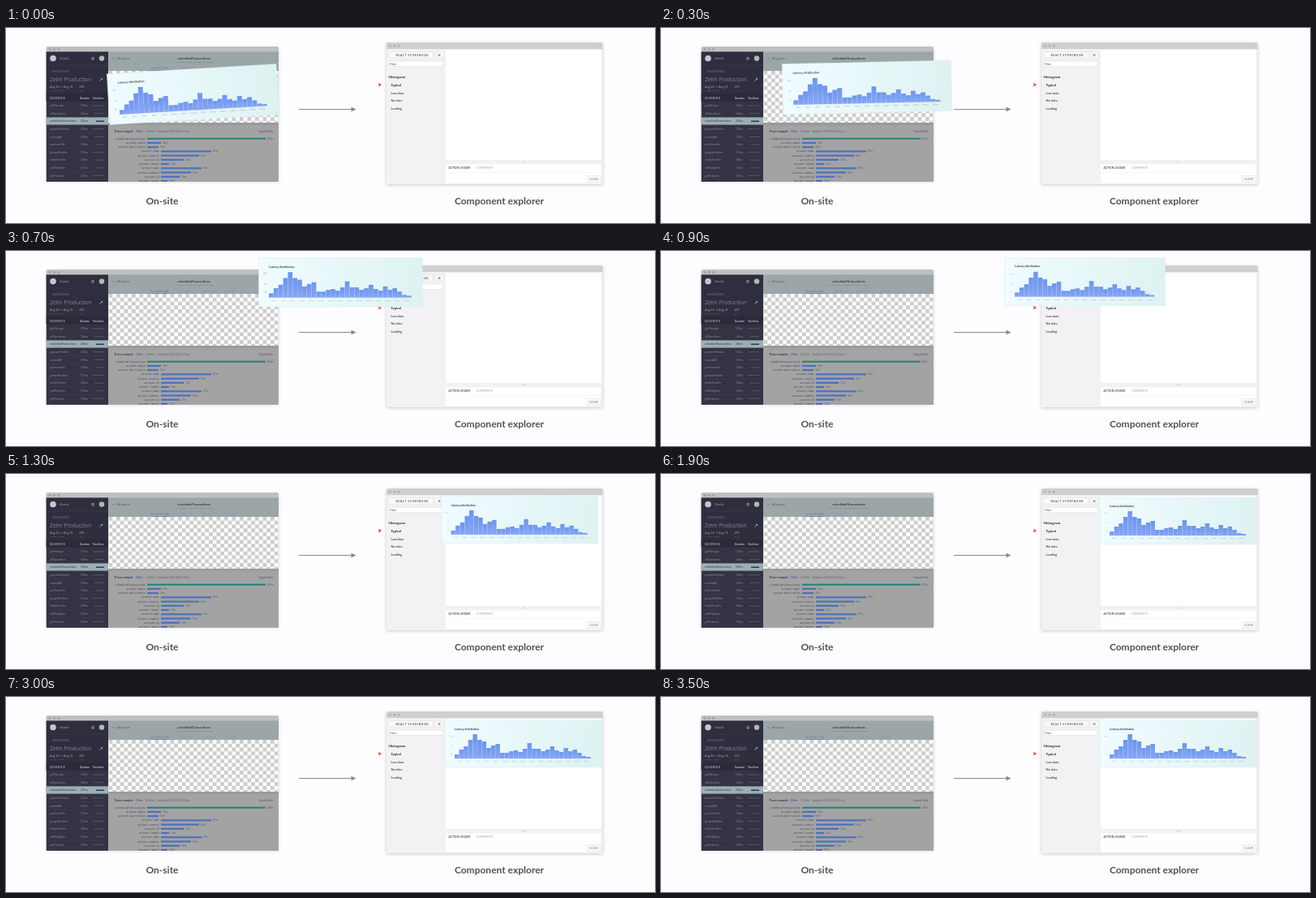
Recreate the animation shown at these times as an HTML page. Size 800 by 241 pixels, loop 3600 ms.

```html
<!DOCTYPE html>
<html lang="en">
<head>
<meta charset="utf-8">
<title>From site to component explorer</title>
<style>
  html, body { margin: 0; width: 100%; height: 100%; overflow: hidden; background: #fdfcfe; }
  svg { display: block; width: 800px; height: 241px; }
  text { font-family: Lato, "Open Sans", sans-serif; }
  .light { font-family: "Open Sans", Lato, sans-serif; font-weight: 300; }
  .mono { font-family: "DejaVu Sans Mono", "Noto Sans Mono", monospace; }
</style>
</head>
<body>
<svg id="stage" viewBox="0 0 800 241" xmlns="http://www.w3.org/2000/svg">
  <defs>
    <pattern id="checks" x="126.5" y="53" width="9.5" height="9.5" patternUnits="userSpaceOnUse">
      <rect width="9.5" height="9.5" fill="#fdfdfd"/>
      <path d="M0 0h4.75v4.75h-4.75zM4.75 4.75h4.75v4.75h-4.75z" fill="#cdcdcd"/>
    </pattern>
    <linearGradient id="sky">
      <stop offset="0" stop-color="#f0fcff"/>
      <stop offset="1" stop-color="#def2f2"/>
    </linearGradient>
    <linearGradient id="barFill" x2="0" y2="1">
      <stop offset="0" stop-color="#6f95ea"/>
      <stop offset="1" stop-color="#86a6f5"/>
    </linearGradient>
    <filter id="soft" x="-10%" y="-10%" width="120%" height="120%">
      <feGaussianBlur stdDeviation="2"/>
    </filter>
    <clipPath id="siteClip"><rect x="49.5" y="23" width="286.5" height="167"/></clipPath>
  </defs>
  <g id="site"></g>
  <g id="explorer"></g>
  <g id="captions"></g>
  <g id="card"></g>
</svg>
<script>
const get = id => document.getElementById(id);

function add(parent, tag, attrs, content) {
  const node = document.createElementNS("http://www.w3.org/2000/svg", tag);
  for (const key in attrs) node.setAttribute(key, attrs[key]);
  if (content) node.textContent = content;
  return parent.appendChild(node);
}
const box = (p, x, y, width, height, fill, more) =>
  add(p, "rect", { x, y, width, height, fill, ...more });
const dot = (p, cx, cy, r, fill) => add(p, "circle", { cx, cy, r, fill });
const line = (p, d, stroke, width = 0.5) =>
  add(p, "path", { d, stroke, "stroke-width": width, fill: "none" });
const label = (p, x, y, size, fill, content, more) =>
  add(p, "text", { x, y, "font-size": size, fill, ...more }, content);

const BOLD = { "font-weight": 700 };
const MID = { "text-anchor": "middle" };
const END = { "text-anchor": "end" };

function titleBar(p, x, y, w, h, fill, dotFill) {
  add(p, "path", { d: `M${x} ${y + h}v${2 - h}q0-2 2-2h${w - 4}q2 0 2 2v${h - 2}z`, fill });
  for (let i = 0; i < 3; i++) dot(p, x + 4.5 + i * 5.4, y + h / 2, 1.4, dotFill);
}

function drawSite() {
  const root = get("site");
  box(root, 50, 24, 286, 166, "#000", { opacity: 0.14, filter: "url(#soft)" });
  const g = add(root, "g", { "clip-path": "url(#siteClip)" });
  titleBar(g, 49.5, 23, 286.5, 6.5, "#bfbfc1", "#a0a0a2");
  box(g, 126, 29.5, 210, 160.5, "#a3a3a4");
  box(g, 126, 29.5, 210, 23.5, "#9ca6a8");
  drawMenu(g);

  label(g, 131, 39, 3.6, "#505a68", "←");
  label(g, 137, 39, 3.4, "#505a68", "All queries");
  label(g, 231.5, 39, 4, "#333b48", "scheduledTransactions", { ...MID, ...BOLD });
  label(g, 231.5, 43.2, 2.6, "#6a7480", "2.33 requests · 200k max duration · 3 errors", MID);
  [["OVERVIEW", 190, "#557788"], ["TRACES", 223, "#87939a"], ["ERRORS", 251, "#87939a"], ["QUERY", 277, "#87939a"]]
    .forEach(([name, x, fill]) =>
      label(g, x, 50.8, 3.1, fill, name, { ...MID, "letter-spacing": 0.8 }));
  box(g, 179, 52.3, 23, 0.7, "#5f8796");
  box(g, 126, 53, 210, 64, "url(#checks)");

  box(g, 126, 117, 210, 3, "#999b9d");
  label(g, 133.5, 129.2, 4, "#333841", "Trace sample", BOLD);
  label(g, 160, 129.2, 3.3, "#3e62ad", "Other", BOLD);
  label(g, 172, 129.2, 3, "#5d6169", "12 fields");
  label(g, 186, 129.2, 2.9, "#5d6169", "Sampled at 8/29/2016 2:35 pm");
  label(g, 329, 129.2, 3, "#50545c", "Expand fields", END);

  // name, left edge of bar, bar length, time
  const spans = [
    ["scheduledTransactions", 174, 146, "200ms"], ["account.begin", 174, 17, "22ms"],
    ["account.description", 174, 14, "18ms"], ["account.name", 191, 62, "83ms"],
    ["account.country", 191, 47, "63ms"], ["account.id", 191, 28, "37ms"],
    ["account.length", 191, 10, "13ms"], ["account.name", 191, 50, "67ms"],
    ["account.summary", 191, 37, "50ms"], ["account.id", 191, 23, "31ms"],
    ["account.length", 191, 8, "11ms"]
  ];
  spans.forEach(([name, x, w, time], i) => {
    const y = 136.7 + i * 5.23;
    label(g, x - 2.5, y + 1, 2.95, "#34373e", name, { ...END, class: "mono" });
    box(g, x, y - 1, w, 2.1, i ? "#4a6dbf" : "#2b8175");
    label(g, x + w + 2, y + 1, 2.7, "#5e626b", time);
  });
}

function drawMenu(g) {
  const pale = "#a0a2b0";
  box(g, 49.5, 29.5, 76.5, 160.5, "#333344");
  box(g, 49.5, 29.5, 76.5, 61, "#2f2e3f");
  dot(g, 58, 37.5, 3.8, "#c3c6d0");
  label(g, 66, 39.2, 4.4, pale, "Ovelix", { "font-style": "italic" });
  add(g, "circle", { cx: 107, cy: 37.7, r: 1.4, fill: "none", stroke: pale, "stroke-width": 1 });
  dot(g, 118, 37.5, 3.2, "#b9b5b4");
  line(g, "M49.5 46h76.5", "#3c3c4d");
  label(g, 57, 54.5, 2.9, "#6c6f80", "ENVIRONMENT");
  label(g, 54, 65.7, 6.9, "#aeb1be", "Zelm Production", { class: "light" });
  line(g, "M115.5 65.5l2.5-2.5", pale, 1);
  dot(g, 118.3, 62.8, 1, pale);
  label(g, 54, 74, 3.7, pale, "Aug 26 → Aug 31");
  label(g, 90.5, 74, 3.7, pale, "491");
  label(g, 54, 78, 2.6, "#6c6f80", "4:26pm      4:26pm");
  label(g, 90.5, 78, 2.6, "#6c6f80", "RPM");
  box(g, 49.5, 81, 76.5, 9.5, "#2a2a39");
  label(g, 54, 87.6, 3.3, "#c0c3ce", "QUERIES", { ...BOLD, "letter-spacing": 0.8 });
  label(g, 91, 87.6, 3, "#c0c3ce", "Duration", BOLD);
  label(g, 107, 87.6, 3, "#c0c3ce", "Total time", BOLD);

  const queries = ["getManager", "allOperations", "scheduledTransactions", "paymentModule",
    "custodyAll", "purchaseInfo", "groupsModules", "familyTransfer", "addToOption", "getProducts"];
  queries.forEach((name, i) => {
    const y = 96 + i * 9.6, active = i === 2;
    if (active) box(g, 49.5, y - 4.8, 76.5, 9.2, "#9cafb5");
    else line(g, `M49.5 ${y + 4.8}h76.5`, "#414253");
    const fill = active ? "#303a4a" : "#878a99";
    label(g, 54, y + 1.1, 3.3, fill, name);
    label(g, 92, y + 1.1, 3, fill, `${129 + i * 37 % 90}ms`);
    line(g, `M${107 + i % 3 * 2} ${y}H121`, active ? "#303a4a" : "#5f6273", active ? 1.6 : 0.8);
  });
}

function drawExplorer() {
  const g = get("explorer"), edge = { stroke: "#dadada", "stroke-width": 0.5 };
  box(g, 469, 19, 266.5, 175, "#000", { opacity: 0.2, filter: "url(#soft)" });
  box(g, 469, 26, 266.5, 167, "#f2f1f3");
  titleBar(g, 469, 18, 266.5, 8, "#cfcfd0", "#b0b0b1");

  box(g, 471.5, 29.7, 55, 7.3, "#fafafa", { ...edge, rx: 1 });
  label(g, 500.8, 34.5, 3.4, "#555", "REACT STORYBOOK", { ...MID, ...BOLD, "letter-spacing": 0.55 });
  box(g, 529, 29.7, 10, 7.3, "#fafafa", { ...edge, rx: 1 });
  label(g, 534, 35, 4, "#555", "⌘", MID);
  box(g, 471.5, 41, 67, 6.6, "#fff", { ...edge, rx: 1 });
  label(g, 473, 45.5, 3.6, "#555", "Filter");
  label(g, 471.5, 61.8, 4.5, "#222", "Histogram", BOLD);
  ["Typical", "Low data", "No data", "Loading"].forEach((name, i) =>
    label(g, 474.5, 72.4 + i * 9.4, 4, "#222", name, i ? {} : BOLD));
  add(g, "path", { d: "M459.3 67.8l4 2.3-4 2.3z", fill: "#e85a45" });

  box(g, 541.5, 27, 192.5, 136.5, "#fff", { stroke: "#ebebeb", "stroke-width": 0.5 });
  for (let i = 0; i < 3; i++) dot(g, 636.5 + i * 1.6, 165.5, 0.45, "#999");
  box(g, 541.5, 168, 192.5, 24, "#fff", { stroke: "#ebebeb", "stroke-width": 0.5 });
  label(g, 545.5, 174.4, 3.1, "#444", "ACTION LOGGER", { ...BOLD, "letter-spacing": 0.15 });
  label(g, 580, 174.4, 3.1, "#999", "COMMENTS", { "letter-spacing": 0.3 });
  line(g, "M541.5 178.5h192.5", "#efefef");
  box(g, 716, 182.8, 17, 7.6, "#fafafa", edge);
  label(g, 724.5, 187.8, 3.3, "#777", "CLEAR", { ...MID, "letter-spacing": 0.2 });
}

function drawCaptions() {
  const g = get("captions");
  line(g, "M361 100.5h66", "#8a8a8c", 1);
  add(g, "path", { d: "M425.5 97.7l6 2.8-6 2.8z", fill: "#858587" });
  label(g, 192.5, 218, 12, "#525256", "On-site", { ...MID, ...BOLD });
  label(g, 608, 218, 12, "#525256", "Component explorer", { ...MID, ...BOLD });
}

// The card is drawn around its own centre, at its landing size.
function drawCard() {
  const g = get("card");
  const heights = [5, 11, 15, 23, 30, 23, 21, 13, 16, 18, 7, 7, 9, 10, 8,
    12, 19, 12, 12, 9, 11, 15, 10, 8, 13, 9, 11, 7, 3, 2];
  const step = 5.6, left = -84.5, base = 18;
  box(g, -96.5, -29, 193, 58, "url(#sky)", { stroke: "#d9e6e8", "stroke-width": 0.4 });
  label(g, left, -17.2, 3.4, "#3b4350", "Latency distribution", BOLD);
  [["10k", -9], ["5k", 3], ["2k", 13]].forEach(([name, y]) =>
    label(g, -87, y, 2.6, "#b9a2a2", name, END));
  line(g, `M${left} ${base}h169`, "#b6c9e6", 0.4);
  heights.forEach((h, i) => {
    box(g, left + i * step, base - h, step - 0.12, h, "url(#barFill)");
    if (i % 2 === 0)
      label(g, left + (i + 1) * step, 22, 2.3, "#98a3b4", `${20 + i * 10}ms`, MID);
  });
}

const LOOP = 3600, TICK = 100;
const clamp = v => Math.min(1, Math.max(0, v));
const easeInOut = p => p < 0.5 ? 2 * p * p : 1 - 2 * (1 - p) ** 2;
const bend = (a, c, b, s) => (1 - s) ** 2 * a + 2 * s * (1 - s) * c + s * s * b;

function pose(t) {
  const s = easeInOut(clamp((t - 76) / 1320));
  const x = 230.5 + 407 * s;
  const y = bend(82, 4, 58, s);
  const turn = -3.4 * (1 - easeInOut(clamp((t - 60) / 420)));
  const scale = (209 - 16 * s) / 193;
  get("card").setAttribute("transform", `translate(${x} ${y}) rotate(${turn}) scale(${scale})`);
}

function tick() {
  const t = performance.now() % LOOP;
  pose(Math.floor(t / TICK) * TICK);
  requestAnimationFrame(tick);
}

drawSite();
drawExplorer();
drawCaptions();
drawCard();
tick();
</script>
</body>
</html>
```
